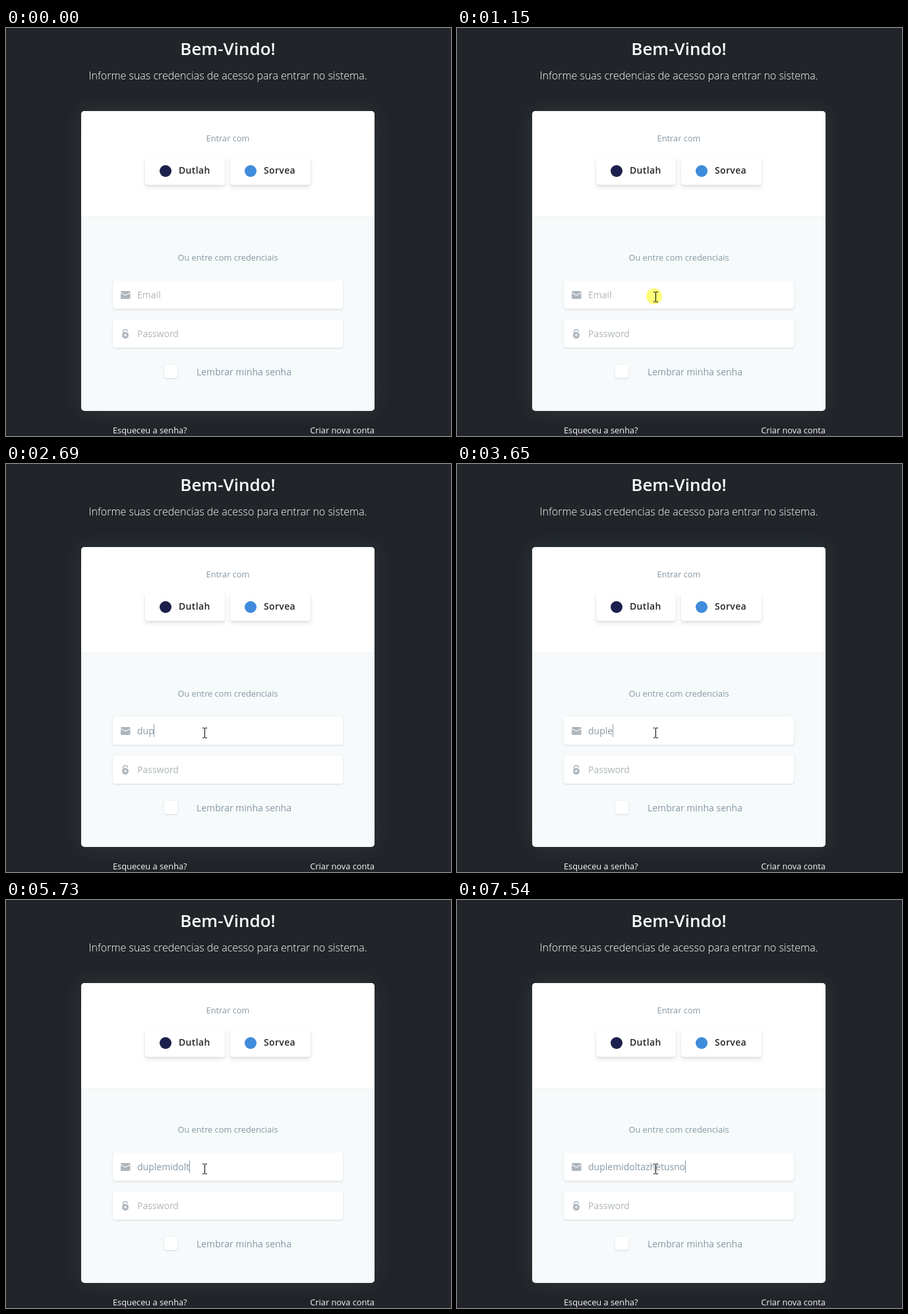
Write an HTML page that moves like this. It is 675x619 px and loops after 8 s.

```html
<!DOCTYPE html>
<html lang="pt-BR">
<head>
<meta charset="utf-8">
<title>Bem-Vindo</title>
<style>
  html, body { margin: 0; width: 100%; height: 100%; overflow: hidden; background: #212529; }
  #stage {
    position: relative; width: 675px; height: 619px; overflow: hidden;
    font: 14px "Open Sans", "Noto Sans", sans-serif; color: #8898a4;
  }
  #stage > * { position: absolute; }
  p { margin: 0; white-space: pre; line-height: normal; }
  .mid { left: 114px; width: 445px; text-align: center; }
  .small { font-size: 12.8px; }
  .light { color: #f8f9fa; }
  .hint { color: #adb5b9; }
  .title { top: 13px; font-size: 26px; font-weight: 600; color: #fff; }
  .lead { top: 61px; font-size: 16px; font-weight: 300; color: #fff; }
  .card {
    left: 114px; top: 126px; width: 445px; height: 455px; border-radius: 5px;
    background: #f6fafb; box-shadow: 0 0 32px rgba(136, 152, 170, .15);
  }
  .head {
    left: 114px; top: 126px; width: 445px; height: 160px; border-radius: 5px 5px 0 0;
    background: #fff; border-bottom: 1px solid #eef1f1;
  }
  .btn {
    top: 195px; height: 43px; border-radius: 4px; background: #fff;
    box-shadow: 0 4px 6px rgba(50, 50, 93, .11), 0 1px 3px rgba(0, 0, 0, .08);
  }
  .name { top: 206px; font-weight: 600; letter-spacing: .35px; color: #212529; }
  .dot { top: 208px; width: 18px; height: 18px; border-radius: 50%; }
  .field {
    left: 162px; width: 349px; height: 43px; border-radius: 4px; background: #fff;
    box-shadow: 0 1px 3px rgba(50, 50, 93, .15), 0 1px 0 rgba(0, 0, 0, .02);
  }
  .check { left: 240px; top: 511px; width: 20px; height: 20px; }
  #caret { top: 395px; width: 1px; height: 19px; background: #8898a4; }
  svg { left: 0; top: 0; }
</style>
</head>
<body>
<div id="stage">
  <p class="mid title">Bem-Vindo!</p>
  <p class="mid lead">Informe suas credencias de acesso para entrar no sistema.</p>

  <div class="card"></div>
  <div class="head"></div>
  <p class="mid small" style="top:158px">Entrar com</p>
  <div class="btn" style="left:211px;width:121px"></div>
  <div class="dot" style="left:233px;background:#1b1f4b"></div>
  <p class="name" style="left:262px">Dutlah</p>
  <div class="btn" style="left:340px;width:122px"></div>
  <div class="dot" style="left:362px;background:#3f8bdc"></div>
  <p class="name" style="left:391px">Sorvea</p>

  <p class="mid small" style="top:339px">Ou entre com credenciais</p>
  <div class="field" style="top:383px"></div>
  <div class="field" style="top:442px"></div>
  <div class="field check"></div>
  <p style="left:289px;top:512px">Lembrar minha senha</p>
  <p class="small light" style="left:162px;top:601px">Esqueceu a senha?</p>
  <p class="small light" style="right:116px;top:601px">Criar nova conta</p>

  <svg width="675" height="619">
    <rect x="174" y="399" width="14.5" height="12" rx="1.5" fill="#adb5bd"/>
    <path d="M174 401.8l7.2 3.7 7.3-3.7" fill="none" stroke="#fff" stroke-width="1.1"/>
    <g fill="none" stroke="#adb5bd">
      <path d="M177.7 464v-3.2a3.3 3.3 0 0 1 6.6 0" stroke-width="1.4"/>
      <circle cx="181" cy="466.2" r="3.5" stroke-width="3"/>
      <path d="M181 466v2.6" stroke-width="1.3"/>
    </g>
    <circle id="glow" cx="299" cy="407" r="12" fill="#ffff78"/>
  </svg>

  <p id="hint" class="hint" style="left:199px;top:395px">Email</p>
  <p class="hint" style="left:199px;top:454px">Password</p>
  <p id="typed" style="left:199px;top:395px"></p>
  <div id="caret"></div>

  <svg width="675" height="619">
    <g id="beam">
      <path d="M-3-8h3v1h-3zM1-8h3v1h-3zM0-7h1v14h-1zM-3 7h3v1h-3zM1 7h3v1h-3z" fill="#000" shape-rendering="crispEdges"/>
    </g>
    <g id="arrow">
      <path d="M.5.8v15.4l3.6-3.4 2.4 5.6 2.4-1-2.4-5.4h5z" fill="#fff" stroke="#000"/>
    </g>
  </svg>
</div>

<script>
const LOOP = 8000;
const LOGIN = "duplemidoltazhetusno";
const KEYS = [2090, 2290, 2690, 3450, 3650, 3920, 4120, 4250, 4870, 5070,
              5720, 5860, 5990, 6260, 6330, 6660, 6930, 7130, 7340, 7540];
const BLINKS = [1690, 3250, 4800, 5600];
const FOCUS = 1220;
const TEXT_X = 199;
const START = [512, 529], REST = [367, 421], END = [301, 408];

const el = id => document.getElementById(id);
const [glow, hint, typed, caret, beam, arrow] =
  ["glow", "hint", "typed", "caret", "beam", "arrow"].map(el);
const show = (node, on) => { node.style.visibility = on ? "visible" : "hidden"; };
const mix = (a, b, k) => a.map((v, i) => Math.round(v + (b[i] - v) * k));

// The pointer is sampled about every 70 ms.
function pointer(t) {
  if (t < 670) {
    const u = Math.min(5, Math.floor((t - 70) / 68)) / 5;
    return mix(START, REST, 1 - (1 - u) ** 2);
  }
  const u = Math.min(5, Math.floor((t - 670) / 70) + 1) / 5;
  return mix(REST, END, u * u * (3 - 2 * u));
}

const overField = ([x, y]) =>
  x >= 162 && x < 511 && ((y >= 383 && y < 426) || (y >= 442 && y < 485));

function drawPointer(t) {
  const pos = pointer(Math.max(t, 70));
  const text = overField(pos);
  for (const node of [beam, arrow]) node.setAttribute("transform", `translate(${pos})`);
  show(beam, t >= 70 && text);
  show(arrow, t >= 70 && !text);
}

function drawText(t) {
  const count = KEYS.filter(k => k <= t).length;
  const last = count ? KEYS[count - 1] : FOCUS;
  const blinked = BLINKS.some(b => b > last && b <= t);
  typed.textContent = LOGIN.slice(0, count);
  show(hint, count === 0);
  show(caret, t >= FOCUS && !blinked);
  caret.style.left = TEXT_X + Math.floor(typed.getBoundingClientRect().width) + "px";
}

function frame() {
  const t = performance.now() % LOOP;
  drawPointer(t);
  drawText(t);
  show(glow, t >= 1150 && t < 1410);
  requestAnimationFrame(frame);
}
frame();
</script>
</body>
</html>
```
